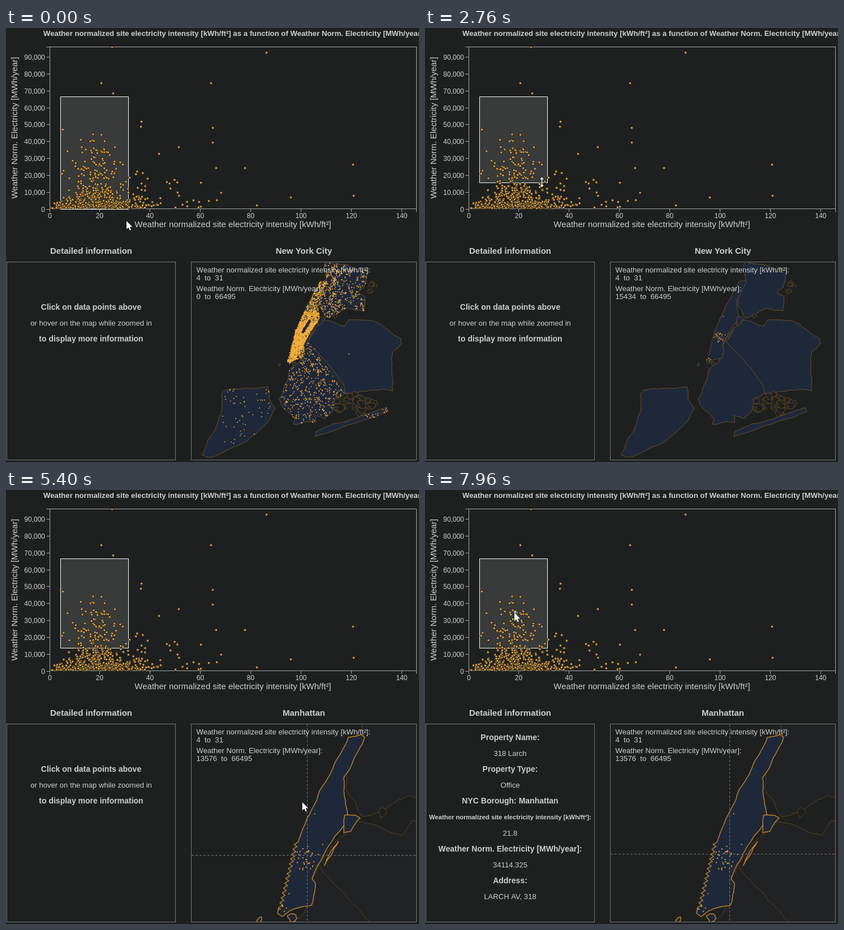
These frames come from a looping animation (730 by 767 pixels, 8000 ms). An HTML page with a canvas:

```html
<!DOCTYPE html>
<html lang="en">
<head>
<meta charset="utf-8">
<title>Electricity dashboard</title>
<style>
html, body { margin: 0; width: 100%; height: 100%; overflow: hidden; background: #1e2020; }
canvas { display: block; }
</style>
</head>
<body>
<canvas id="c" width="730" height="767"></canvas>
<script>
const g = document.getElementById('c').getContext('2d');
const BG = '#1e2020', INK = '#cdcdcd', LAND = '#1f2839', SHORE = '#6a5128';
const ZOOM = 2.19, ZX = -609.6, ZY = -544.1;
const NAME_X = 'Weather normalized site electricity intensity [kWh/ft²]';
const NAME_Y = 'Weather Norm. Electricity [MWh/year]';

let seed = 11;
const rnd = () => (seed = seed * 16807 % 2147483647) / 2147483647;
const gauss = () => rnd() + rnd() + rnd() + rnd() + rnd() + rnd() - 3;
const expo = mean => -Math.log(rnd()) * mean;
const times = (n, f) => Array.from({ length: n }, (_, i) => f(i));
const pairs = s => s.trim().split(/\s+/).map(p => p.split(',').map(Number));
const unzoom = pts => pts.map(([x, y]) => [(x - ZX) / ZOOM, (y - ZY) / ZOOM]);

// Coastline through a few points, roughened by midpoint displacement.
function coast(pts, amp = .1, open = false) {
  for (let k = 0; k < 3; k++) {
    pts = pts.flatMap((p, i) => {
      if (open && i === pts.length - 1) return [p];
      const q = pts[(i + 1) % pts.length], d = (rnd() - .5) * 2 * amp;
      const dx = q[0] - p[0], dy = q[1] - p[1];
      return [p, [(p[0] + q[0]) / 2 - dy * d, (p[1] + q[1]) / 2 + dx * d]];
    });
  }
  const path = new Path2D();
  pts.forEach(p => path.lineTo(...p));
  if (!open) path.closePath();
  return path;
}
function blob(x, y, r) {
  return coast(times(7, i => {
    const a = i * Math.PI * 2 / 7, d = r * (.45 + rnd() * .7);
    return [x + d * 1.2 * Math.cos(a), y + d * Math.sin(a)];
  }), .2);
}

const staten = coast(pairs(`381,647 386,640 440,637 463,634 465,655 476,672 462,697 440,718 420,733 395,744
  360,759 347,755 354,737 370,710 382,670`), .07);
const island = coast(pairs(`531,551 547,530 562,516 577,519 599,527 606,515 632,516 655,520 667,528 698,549
  699,558 683,574 682,600 684,641 648,640 600,645 580,656 582,668 564,690 546,685 548,697 508,700 511,691
  486,666 483,656 498,622 501,604 519,590 525,565`), .08);
const border = coast(pairs('531,551 558,582 598,632 600,645'), .06, true);
const bronx = coast(pairs(`567,412 605,419 622,431 640,428 633,458 622,468 634,474 633,500 604,495 588,503
  566,512 552,489 556,464 567,446 562,424`), .08);
const rockaway = coast(pairs('546,722 548,713 610,692 673,671 675,678 625,695'), .05);
const piers = times(28, i => [482 + i * 1.05 + i % 2 * 6, 738 - i * 4.3]);
const manhattan = coast(unzoom([
  ...pairs(`605,437 628,432 634,437 622,462 597,508 598,540 604,572 597,593 546,674 541,687 547,695 540,734
    510,740 488,754 480,748`),
  ...piers, ...pairs('525,598 555,530 580,485')]), .05);
const park = new Path2D('M521 538L526 541L540 518L535 515Z');
const isles = [
  coast(unzoom(pairs('598,575 618,575 626,580 610,603 597,606')), .07),
  coast(unzoom(pairs('588,621 575,645 562,664 572,643')), .07),
  blob(510, 594, 4), blob(483, 595, 2.5)
];
const bay = times(26, () => {
  const a = rnd() * 6.28, d = Math.sqrt(rnd());
  return blob(615 + 36 * d * Math.cos(a), 664 + 19 * d * Math.sin(a), 3 + rnd() * 6);
});
const islets = [blob(582, 509, 4), ...times(7, () => blob(641 + rnd() * 13, 447 + rnd() * 28, 2 + rnd() * 4))];

// Buildings: long-tailed energy use, larger in the two business districts.
const homes = [];
function populate(path, x0, y0, w, h, n, keep, inner) {
  for (let i = 0; i < n; i++) {
    const x = x0 + rnd() * w, y = y0 + rnd() * h, k = rnd(), u = rnd();
    if (k > keep(x, y) || !g.isPointInPath(path, x, y)) continue;
    const busy = inner && (Math.hypot(x - 521, y - 546) < 10 || Math.hypot(x - 502, y - 586) < 5);
    homes.push({ x, y, inner, e: (busy ? 8500 : 1350) * (u ** -.4 - 1) });
  }
}
const clump = (x, y) => .5 + .5 * Math.sin(x / 3) * Math.sin(y / 4);
populate(manhattan, 496, 444, 74, 150, 12000, (x, y) =>
  g.isPointInPath(park, x, y) ? 0 : y < 500 ? .25 : y < 520 ? .5 : x - 507 > (592 - y) * .65 ? .25 : 1, true);
populate(bronx, 550, 414, 92, 98, 1500, (x, y) => clump(x, y) * (x < 590 ? 1.2 : .55));
populate(island, 484, 556, 118, 146, 1900, (x, y) =>
  y < 563 + (x - 543) * 1.47 ? 0 : clump(x, y) * (y < 610 ? 1.2 : .8));
populate(staten, 380, 634, 95, 100, 80, () => .8);
populate(rockaway, 632, 670, 44, 24, 130, () => .6);
homes.push({ x: 606, y: 576, e: 300 });

// Scatter plot: the far outliers, a peak, the dense floor and a thinning tail.
const dots = [
  ...pairs(`187,33 168,97 189,115 460,43 362,97 239,165 238,174 100,179 365,176 365,202 305,210 270,222
    371,247 422,247 613,241 614,296 503,299 443,313 344,273 160,219 173,219`),
  ...times(58, () => {
    const y = 178 + 88 * Math.sqrt(rnd());
    return [160 + gauss() * (12 + (y - 178) * .3), y];
  }),
  ...times(430, () => {
    const x = 152 + gauss() * 46;
    return [x, 318 - expo(4.5 + 19 * Math.exp(-(((x - 155) / 36) ** 2)))];
  }),
  ...times(100, () => [200 + expo(42), 317 - expo(15)])
].filter(([x, y], i) => i < 21 || x > 78 && x < 380 && y > 170);

const cursorKeys = [[480, 213, 341], [760, 193, 337], [1040, 205.5, 319], [3480, 207, 278], [4280, 532, 514],
  [4680, 534, 518], [4720, 535, 524], [5280, 535, 524], [5600, 505, 598], [6120, 330, 422], [6280, 217.5, 244],
  [6480, 167, 203], [6760, 173, 219], [7840, 173, 219], [7960, 158, 217]];
const floorKeys = [[1480, 0], [2200, 5999], [3120, 21500], [3320, 13576]];

function at(keys, t) {
  const i = keys.findIndex(k => k[0] > t);
  if (i <= 0) return keys.at(i).slice(1);
  const a = keys[i - 1], b = keys[i], f = (t - a[0]) / (b[0] - a[0]);
  return a.slice(1).map((v, j) => v + (b[j + 1] - v) * f);
}

function text(s, x, y, size, align = 'center', weight = '') {
  g.font = `${weight} ${size}px "Liberation Sans", Arial, sans-serif`;
  g.textAlign = align;
  g.fillStyle = INK;
  g.fillText(s, x, y);
}
function line(x1, y1, x2, y2) {
  g.beginPath();
  g.moveTo(x1, y1);
  g.lineTo(x2, y2);
  g.stroke();
}

function chart(bottom, hover) {
  text(`${NAME_X} as a function of ${NAME_Y}`, 66, 14, 13.2, 'left', 'bold');
  text(NAME_X, 401, 352, 15);
  g.save();
  g.translate(20, 176.5);
  g.rotate(-Math.PI / 2);
  text(NAME_Y, 0, 0, 15);
  g.restore();

  g.lineWidth = 1;
  g.strokeStyle = '#a6a6a6';
  g.strokeRect(77.5, 33.5, 648, 286);
  line(71.5, 33.5, 77, 33.5);
  line(725.5, 320, 725.5, 325);
  for (let i = 0; i < 10; i++) {
    const y = Math.round(319.5 - i * 29.83) + .5;
    line(71.5, y, 77, y);
    text((i * 10000).toLocaleString('en-US'), 69, y + 4, 12, 'right');
  }
  for (let v = 0; v <= 140; v += 20) {
    const x = Math.round(76.5 + v * 4.446) + .5;
    line(x, 320, x, 325);
    text(v, x, 336, 12);
  }

  g.fillStyle = 'rgba(255,255,255,.12)';
  g.fillRect(96, 122, 121, bottom - 122);
  g.strokeStyle = '#f4f4f4';
  g.strokeRect(96.5, 121.5, 120, bottom - 121.5);

  g.save();
  g.beginPath();
  g.rect(77, 33, 650, 287);
  g.clip();
  g.strokeStyle = '#23211d';
  for (const [x, y] of dots) {
    const hot = hover && Math.hypot(x - hover[0], y - hover[1]) < 3;
    g.fillStyle = hot ? '#a9b4bb' : '#d9a144';
    g.beginPath();
    g.arc(x + .5, y + .5, hot ? 3.2 : 2.2, 0, 7);
    g.fill();
    g.stroke();
  }
  g.restore();
}

function panel(picked) {
  const rows = picked
    ? ['*Property Name:', '318 Larch', '*Property Type:', 'Office', '*NYC Borough: Manhattan', `^${NAME_X}:`,
      '21.8', `*${NAME_Y}:`, '34114.325', '*Address:', 'LARCH AV, 318']
    : ['', '', '*Click on data points above', 'or hover on the map while zoomed in', '*to display more information'];
  text('Detailed information', 150.5, 399, 15, 'center', 'bold');
  rows.forEach((r, i) => {
    const bold = /^[*^]/.test(r), size = r[0] === '*' ? 14 : r[0] === '^' ? 11.25 : 13.1;
    text(bold ? r.slice(1) : r, 150.5, 441.7 + i * 28.15, size, 'center', bold ? 'bold' : '');
  });
  g.strokeStyle = '#777';
  g.strokeRect(1.5, 413.5, 298, 350);
}

function map(floor, zoomed, hot, cross) {
  const s = zoomed ? ZOOM : 1;
  text(zoomed ? 'Manhattan' : 'New York City', 526.5, 399, 15, 'center', 'bold');
  g.save();
  g.beginPath();
  g.rect(327, 413, 399, 351);
  g.clip();
  g.save();
  if (zoomed) g.transform(ZOOM, 0, 0, ZOOM, ZX, ZY);
  const draw = (paths, fill, edge, w = 1) => {
    g.fillStyle = fill;
    g.strokeStyle = edge;
    g.lineWidth = w / s;
    for (const p of paths) {
      g.fill(p);
      g.stroke(p);
    }
  };
  const edge = zoomed ? '#57431f' : SHORE, bright = zoomed || hot;
  draw([staten, island, bronx, rockaway], zoomed ? '#212224' : LAND, edge);
  draw([...bay, ...islets], BG, edge);
  g.stroke(border);
  draw([manhattan, ...isles], LAND, bright ? '#bd8629' : SHORE, bright ? 1.4 : 1);
  g.fillStyle = floor > 3000 ? '#dc9e3a' : '#f6b03c';
  const d = (zoomed ? 2 : 1.6) / s;
  for (const h of homes)
    if (h.e >= floor && (h.inner || !zoomed)) g.fillRect(h.x - d / 2, h.y - d / 2, d, d);
  g.restore();
  if (zoomed) {
    g.lineWidth = 1;
    g.strokeStyle = '#77756f';
    g.setLineDash([4, 3]);
    line(328, cross[1], 726, cross[1]);
    line(cross[0], 414, cross[0], 764);
  }
  g.restore();
  [`${NAME_X}:`, '4  to  31', `${NAME_Y}:`, `${Math.round(floor)}  to  66495`].forEach((r, i) =>
    text(r, 336.5, 432 + i % 2 * 14 + (i >> 1) * 33, 13.13, 'left'));
  g.lineWidth = 1;
  g.strokeStyle = '#777';
  g.strokeRect(327.5, 413.5, 398, 350);
}

const arrow = new Path2D('M0 0V14.5L3.4 11.4L5.7 16.6L8 15.6L5.9 10.5H10.4Z');
const resize = new Path2D('M0 -9L3.5 -5H.8V5H3.5L0 9L-3.5 5H-.8V-5H-3.5Z');
function cursor(x, y, kind, busy) {
  g.save();
  g.translate(x, y);
  if (kind === 'ew') g.rotate(Math.PI / 2);
  const p = kind ? resize : arrow;
  g.lineWidth = 1;
  g.strokeStyle = '#000';
  g.stroke(p);
  g.fillStyle = '#fff';
  g.fill(p);
  if (busy) {
    g.lineWidth = 2.6;
    g.strokeStyle = '#2795dc';
    g.beginPath();
    g.arc(11.5, 0, 5, 0, 7);
    g.stroke();
  }
  g.restore();
}

function frame(now) {
  const t = Math.floor(now % 8000 / 40) * 40;
  const [floor] = at(floorKeys, t), [x, y] = at(cursorKeys, t);
  const bottom = Math.round(319.5 - floor * .002983) + .5;
  const dragging = t >= 1040 && t < 3480;
  const kind = dragging ? 'ns' : t >= 6240 && t < 6320 ? 'ew' : '';
  const zoomed = t >= 4800, picked = t >= 6960;
  g.fillStyle = BG;
  g.fillRect(0, 0, 730, 767);
  chart(bottom, t >= 6640 && [x, y]);
  panel(picked);
  map(floor, zoomed, t >= 4240, picked ? [538.5, 643.5] : [532.5, 645.5]);
  cursor(x, dragging ? bottom - 1 : y, kind, t >= 4520 && t < 5000);
  requestAnimationFrame(frame);
}
requestAnimationFrame(frame);
</script>
</body>
</html>
```
